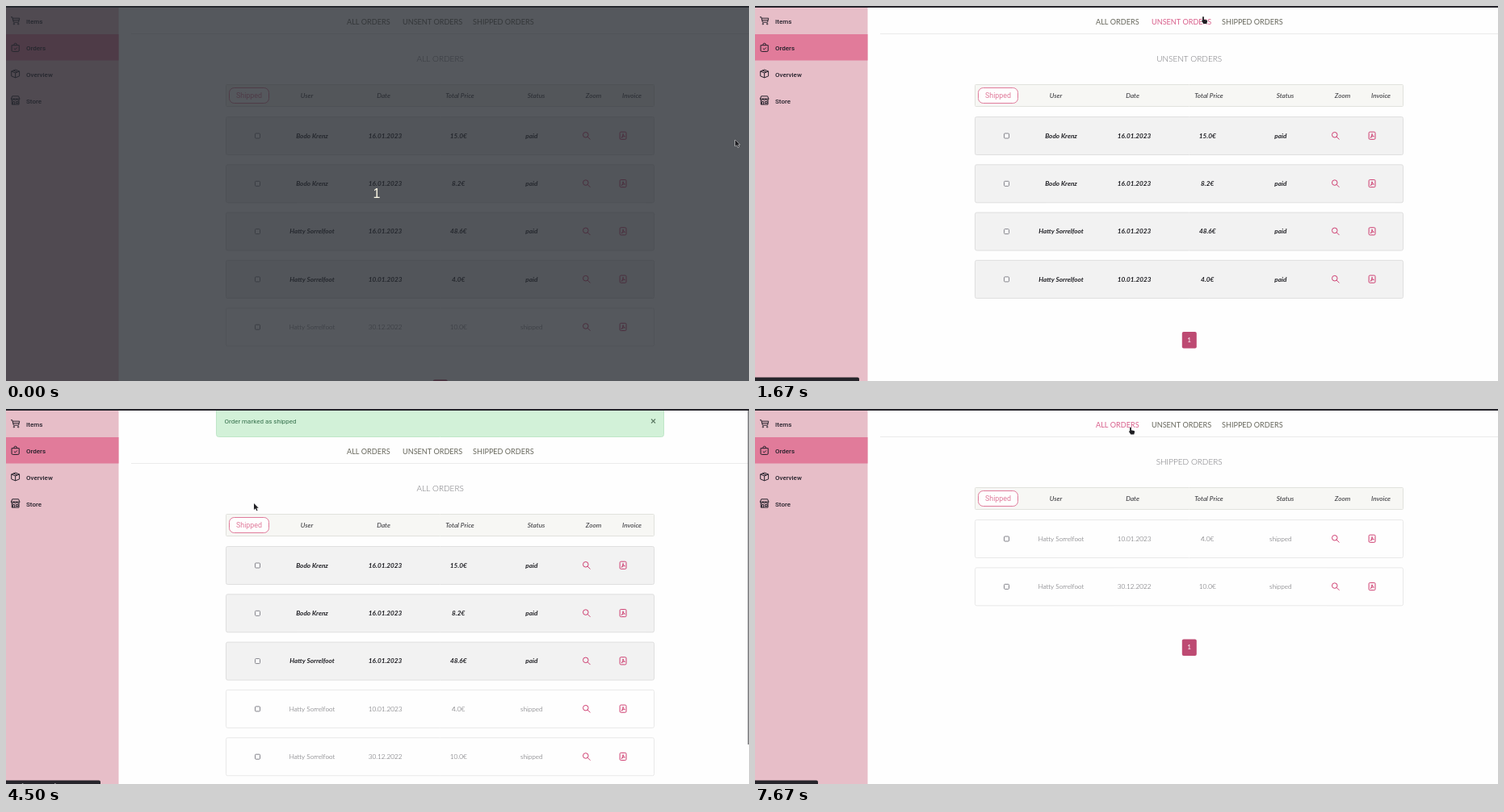
Recreate the animation shown at these times as an HTML page with a canvas. Size 920 by 465 pixels, loop 8 s.

```html
<!DOCTYPE html>
<html lang="en">
<head>
<meta charset="utf-8">
<title>Order administration</title>
<style>
  html, body { margin: 0; width: 100%; height: 100%; overflow: hidden; background: #fefefe; }
  canvas { display: block; }
</style>
</head>
<body>
<canvas id="stage" width="920" height="465"></canvas>
<script>
const ctx = document.getElementById('stage').getContext('2d');
const LOOP = 8000, STEPS = 48;
const LATO = 'Lato, sans-serif', ROBOTO = 'Roboto, sans-serif';
const PINK = '#e07b9b', BERRY = '#cb2f66';

const icons = {
  cart: 'M0 1.5h2.5l2.3 9h8.7l1.7-7H3.2M4 7h10.3M6.5 13.5a1 1 0 1 1-2 0 1 1 0 1 1 2 0M14 13.5a1 1 0 1 1-2 0 1 1 0 1 1 2 0',
  bag: 'M1.5 4.5h13v9a2 2 0 0 1-2 2h-9a2 2 0 0 1-2-2zM5.5 4.5v-1a2.5 2.5 0 0 1 5 0v1M5.5 10l2 2 3.5-3.5',
  box: 'M8 1l7 2.8v8.4L8 15 1 12.2V3.8zM1 3.8L8 6.6l7-2.8M8 6.6V15M4.5 2.4l7 2.8',
  shop: 'M2.5 1h11l2 4.5h-15zM.5 5.5a2.4 2.4 0 0 0 5 0 2.4 2.4 0 0 0 5 0 2.4 2.4 0 0 0 5 0M1.8 8v7.5h12.4V8M3.5 15.5v-5h3v5M9 10.5h4v3H9z',
  zoom: 'M11.5 6.5a5 5 0 1 1-10 0 5 5 0 0 1 10 0zM10.2 10.2l5 5',
  pdf: 'M4 1h8q2 0 2 2v10q0 2-2 2H4q-2 0-2-2V3q0-2 2-2zM5 12c2-2 3-5 3-7.5 0 2.5 2 4.500 3.500 5-2-.5-4 0-6.500 2.500',
};
for (const name in icons) icons[name] = new Path2D(icons[name]);
const arrow = new Path2D('M0 0v8l1.900-1.700 1.400 3 1.200-.6-1.300-2.900h2.500z');
const hand = new Path2D('M-.9.700q.9-1.200 1.800 0v3.100l3.400.7q1 .3.800 1.500L4.300 9H.3L-2 5.500q.1-1.100 1.100-.300z');

const links = [
  { text: 'ALL ORDERS', x: 422, w: 53, url: '127.0.0.1:8000/orders/', bar: 78 },
  { text: 'UNSENT ORDERS', x: 491, w: 72, url: '127.0.0.1:8000/orders/?status=unsent', bar: 129 },
  { text: 'SHIPPED ORDERS', x: 578, w: 75, url: '127.0.0.1:8000/orders/?status=sent', bar: 127 },
];
const menu = [['Items', 'cart'], ['Orders', 'bag'], ['Overview', 'box'], ['Store', 'shop']];
const headings = [['User', 372.5], ['Date', 467.5], ['Total Price', 562], ['Status', 656.5], ['Zoom', 727.5], ['Invoice', 775]];
const orders = [
  ['Bodo Krenz', '16.01.2023', '15.0€'],
  ['Bodo Krenz', '16.01.2023', '8.2€'],
  ['Hatty Sorrelfoot', '16.01.2023', '48.6€'],
  ['Hatty Sorrelfoot', '10.01.2023', '4.0€'],
  ['Hatty Sorrelfoot', '30.12.2022', '10.0€'],
];

// Cursor stops: step, x, y
const path = [
  [2, 903, 166], [9, 555, 13], [12, 555, 13], [18, 310.5, 337], [19, 310.5, 337], [24, 307, 117],
  [27, 307, 117], [34, 805, 13], [36, 805, 13], [40, 612, 20], [43, 612, 20], [46, 465, 22.5],
];

function cursorAt(step) {
  const i = path.findIndex(stop => stop[0] >= step);
  if (i < 0) return path[path.length - 1].slice(1);
  if (i === 0) return path[0].slice(1);
  const [s0, x0, y0] = path[i - 1], [s1, x1, y1] = path[i];
  const u = (step - s0) / (s1 - s0), e = u * u * (3 - 2 * u);
  return [x0 + (x1 - x0) * e, y0 + (y1 - y0) * e];
}

function text(str, x, y, font, color, align = 'left') {
  ctx.font = font;
  ctx.fillStyle = color;
  ctx.textAlign = align;
  ctx.fillText(str, x, y);
}

function box(x, y, w, h, fill, stroke, radius = 0) {
  ctx.beginPath();
  ctx.roundRect(x, y, w, h, radius);
  if (fill) { ctx.fillStyle = fill; ctx.fill(); }
  if (stroke) { ctx.strokeStyle = stroke; ctx.lineWidth = 1; ctx.stroke(); }
}

function icon(name, x, y, size, color) {
  ctx.save();
  ctx.translate(x, y);
  ctx.scale(size / 16, size / 16);
  ctx.strokeStyle = color;
  ctx.lineWidth = 1.4;
  ctx.stroke(icons[name]);
  ctx.restore();
}

function sidebar() {
  box(0, 0, 139.5, 465, '#e7bec8');
  box(0, 35, 139.5, 32.5, '#e17b9a');
  menu.forEach(([label, name], i) => {
    icon(name, 6, 12.7 + 32.8 * i, 11.3, '#24202a');
    text(label, 25, 22 + 32.9 * i, '500 8px ' + ROBOTO, '#24202a');
  });
}

function checkbox(y, checked) {
  box(308.5, y, 6, 6, checked ? '#e95420' : '#fff', checked ? '#e0481a' : '#83838a', 1);
  if (!checked) return;
  ctx.beginPath();
  ctx.moveTo(309.5, y + 3);
  ctx.lineTo(311, y + 4.5);
  ctx.lineTo(313.5, y + 1.5);
  ctx.strokeStyle = '#fff';
  ctx.stroke();
}

function orderRow(order, y, sent, checked) {
  box(272.5, y, 530, 47, sent ? '#fefefe' : '#f2f2f2', sent ? '#e9e9e9' : '#dfdfdf', 2);
  const font = (sent ? '300 8.2px ' : 'italic bold 8.2px ') + LATO;
  const color = sent ? '#55555a' : '#1f1f24';
  checkbox(y + 20.5, checked);
  [...order, sent ? 'shipped' : 'paid'].forEach((value, i) =>
    text(value, 379 + 90.6 * i, y + 26.2, font, color, 'center'));
  icon('zoom', 713.5, y + 18, 10.5, BERRY);
  icon('pdf', 758.8, y + 18, 10.5, BERRY);
}

function table(step, page, dy, onButton) {
  box(272.5, 97.5 + dy, 530, 27, '#f7f7f4', '#e1e2dd', 1);
  box(276.5, 101.5 + dy, 49, 19, onButton ? PINK : '#fefefe', PINK, 6);
  text('Shipped', 301, 114.2 + dy, '8.9px ' + ROBOTO, onButton ? '#fff' : PINK, 'center');
  for (const [label, x] of headings)
    text(label, x, 114.3 + dy, 'italic 500 8.2px ' + LATO, '#3c3c40', 'center');

  let y = 137.5 + dy;
  orders.forEach((order, i) => {
    const sent = i > (step < 26 ? 3 : 2);
    if (page === 1 && sent || page === 2 && !sent) return;
    orderRow(order, y, sent, i === 3 && step >= 19 && step < 26);
    y += 59.3;
  });
  box(528.8, y + 29.3, 18, 20.5, '#bd4a72', null, 2);
  text('1', 537.7, y + 42.2, '8.2px ' + LATO, '#fff', 'center');
}

function alertBox(opacity) {
  ctx.globalAlpha = opacity;
  box(260.5, -4, 554, 38.5, '#d2f1d8', '#bfe6c8', 3);
  text('Order marked as shipped', 270.5, 17.6, '8px ' + ROBOTO, '#35704c');
  ctx.beginPath();
  ctx.moveTo(799, 12.5); ctx.lineTo(804, 17.5);
  ctx.moveTo(804, 12.5); ctx.lineTo(799, 17.5);
  ctx.strokeStyle = '#5c7a64';
  ctx.lineWidth = 1.1;
  ctx.stroke();
  ctx.globalAlpha = 1;
}

function statusBar(label, width) {
  box(-3, 460.5, width + 3, 10, '#26252b', null, 2);
  text(label, 0, 469.5, '7.5px ' + ROBOTO, '#eee');
}

function pointer(x, y, isHand) {
  const shape = isHand ? hand : arrow;
  ctx.save();
  ctx.translate(x, y);
  ctx.lineWidth = 1;
  ctx.strokeStyle = '#f4f4f4';
  ctx.stroke(shape);
  ctx.fillStyle = '#1f1f23';
  ctx.fill(shape);
  ctx.restore();
}

function draw(step) {
  const page = step < 10 ? 0 : step < 26 ? 1 : step < 42 ? 0 : 2;
  const alerting = step >= 26 && step < 36;
  const dy = alerting ? 33 : 0;
  const [x, y] = cursorAt(step);
  const over = links.find(l => x >= l.x && x <= l.x + l.w && y > 10 + dy && y < 28 + dy);
  const onButton = x > 276 && x < 326 && y > 101 + dy && y < 121 + dy;
  const onClose = alerting && x > 796 && y < 22;

  box(0, 0, 920, 465, '#fefefe');
  sidebar();
  box(155, 34 + dy, 765, 1, '#ebebeb');
  for (const link of links)
    text(link.text, link.x, 23.2 + dy, '9.1px ' + LATO, link === over ? '#d9608c' : '#67675c');
  text(links[page].text, 537.7, 69 + dy, '300 10px ' + LATO, '#707075', 'center');
  table(step, page, dy, onButton);
  if (alerting) alertBox(step === 35 ? 0.55 : 1);

  if (page === 0 && step > 2) box(918.5, 2, 1.5, alerting ? 414 : 442, '#77777b');
  if (over) statusBar(over.url, over.bar);
  else if (step >= 26 && step < 29) statusBar('Transferring data from 127.0.0.1…', 117);
  box(0, 0, 920, 2, '#25242b');

  if (step === 0) {
    box(0, 0, 920, 465, 'rgba(38,41,48,.78)');
    text('1', 459, 238, '16px "Liberation Sans", sans-serif', '#fffbe8', 'center');
  }
  pointer(x, y, over || onButton || onClose);
}

// The screen refreshes six times a second.
function tick() {
  const t = performance.now() % LOOP;
  draw(Math.floor((t + 4) / LOOP * STEPS) % STEPS);
  requestAnimationFrame(tick);
}
tick();
</script>
</body>
</html>
```
